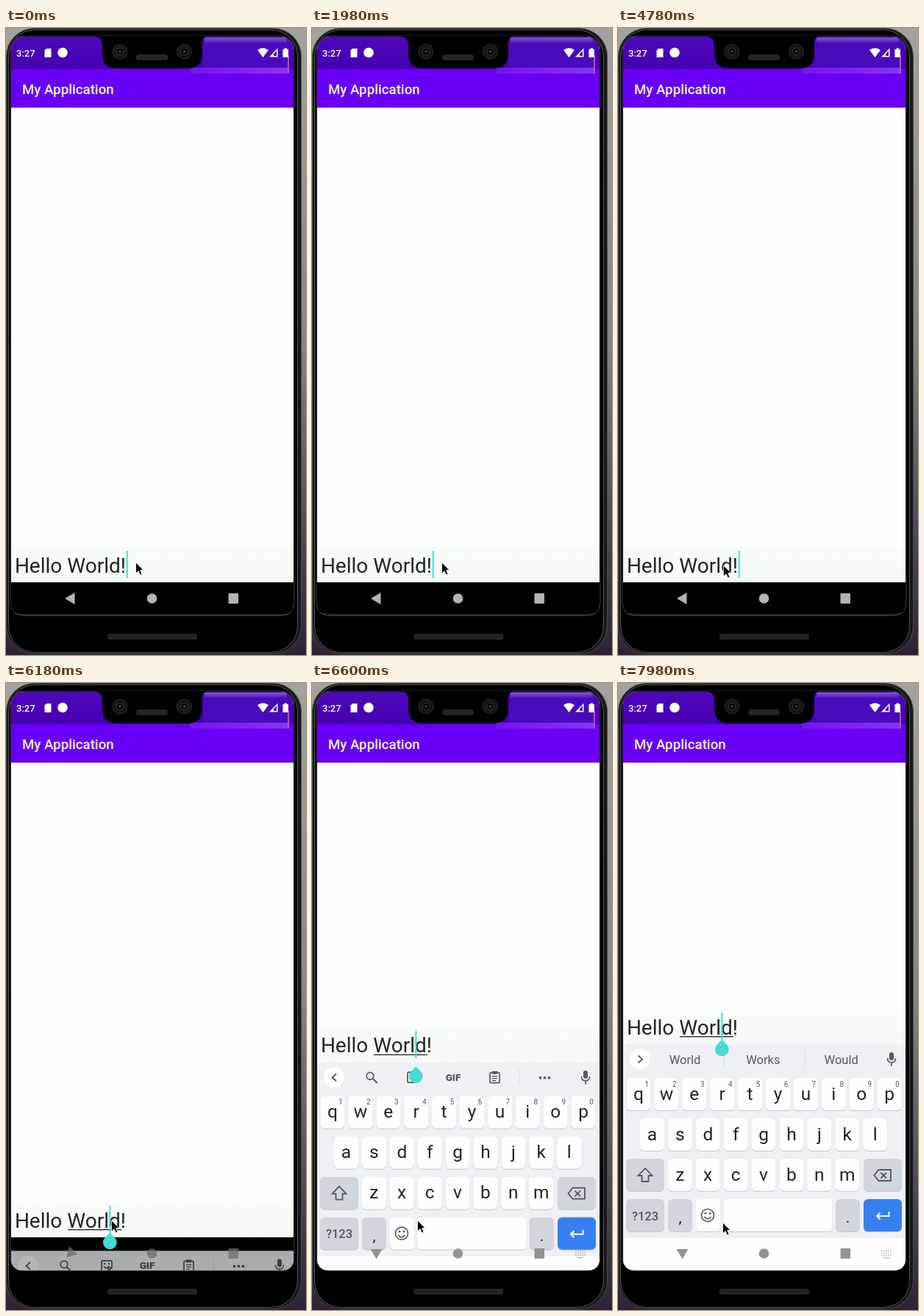
Animation of 408 by 854 pixels, one loop 8000 ms. Source, as an HTML page with a canvas:

```html
<!DOCTYPE html>
<html lang="en">
<head>
<meta charset="utf-8">
<title>Keyboard opening</title>
<style>
  html, body { margin: 0; width: 100%; height: 100%; overflow: hidden; background: #888; }
  canvas { display: block; }
</style>
</head>
<body>
<canvas id="stage" width="408" height="854"></canvas>
<script>
const ctx = document.getElementById('stage').getContext('2d');
const LOOP = 8000;
const CLICK = 5950;        // tap that moves the caret and opens the keyboard
const SUGGEST = 6900;      // toolbar gives way to suggestions
const INK = '#222325', GREY = '#55585c', TEAL = '#44ddd0';
const KEY = '#fefefe', DIM_KEY = '#d1d5dc', DIVIDER = '#d9dce1';

// Keyframe rows: [time, value, value...]
const POINTER = [[3340, 176, 728], [3560, 170, 736], [3900, 156, 741], [4260, 146, 737], [4560, 143, 732],
  [6800, 143, 732], [7800, 142, 735]];
const SLIDE = [[6060, 310], [6120, 301], [6180, 282], [6300, 207], [6420, 125], [6510, 70], [6600, 25], [6660, 8], [6740, 0]];
const HANDLE = [[6230, 263], [6420, 167], [6600, 37], [6660, 14], [6760, 0]];
const NAV_SHADE = [[6060, 1], [6180, 0.29], [6420, 0.12], [6600, 0]];
const BACK_TURN = [[6060, 0], [6300, -Math.PI / 2]];

function at(keys, t) {
  if (t <= keys[0][0]) return keys[0].slice(1);
  for (let i = 1; i < keys.length; i++) {
    const a = keys[i - 1], b = keys[i];
    if (t < b[0]) {
      const p = (t - a[0]) / (b[0] - a[0]);
      return a.slice(1).map((v, j) => v + (b[j + 1] - v) * p);
    }
  }
  return keys[keys.length - 1].slice(1);
}

function rect(x, y, w, h, color) {
  ctx.fillStyle = color;
  ctx.fillRect(x, y, w, h);
}
function box(x, y, w, h, r, fill, stroke, width = 1) {
  ctx.beginPath();
  ctx.roundRect(x, y, w, h, r);
  paint(fill, stroke, width);
}
function disc(x, y, r, fill, stroke, width = 1) {
  ctx.beginPath();
  ctx.arc(x, y, r, 0, 7);
  paint(fill, stroke, width);
}
function shape(d, fill, stroke, width = 1, x = 0, y = 0) {
  ctx.save();
  ctx.translate(x, y);
  const path = new Path2D(d);
  if (fill) { ctx.fillStyle = fill; ctx.fill(path); }
  if (stroke) { ctx.strokeStyle = stroke; ctx.lineWidth = width; ctx.stroke(path); }
  ctx.restore();
}
function paint(fill, stroke, width) {
  if (fill) { ctx.fillStyle = fill; ctx.fill(); }
  if (stroke) { ctx.strokeStyle = stroke; ctx.lineWidth = width; ctx.stroke(); }
}
function text(s, x, y, size, color, weight = 400, align = 'left') {
  ctx.font = `${weight} ${size}px Roboto, sans-serif`;
  ctx.textAlign = align;
  ctx.fillStyle = color;
  ctx.fillText(s, x, y);
}
function gradient(x0, y0, x1, y1, ...colors) {
  const g = ctx.createLinearGradient(x0, y0, x1, y1);
  colors.forEach((c, i) => g.addColorStop(i / (colors.length - 1), c));
  return g;
}

function drawBody() {
  rect(0, 0, 408, 854, gradient(0, 0, 0, 854, '#a3a29e', '#858585', '#2c2436'));
  box(0.5, 0.5, 401, 852, 38, '#18181a', '#48484a');
  box(3.5, 2.5, 393, 848, 36, '#000', '#555557');
  box(6, 11, 386, 789.5, 18, '#000', '#3c3c3e');
  box(138, 825, 122, 8, 3, '#242426');
}

function drawTopBars() {
  rect(7, 56, 384, 52.5, '#6800f6');
  rect(7, 12, 384, 44, gradient(0, 12, 0, 56, '#4c08ba', '#4600b2'));
  rect(268, 13, 116, 43, '#480cbc');
  rect(270, 13, 112, 7, gradient(0, 13, 0, 20, '#7c58d0', '#5519c4'));
  rect(250, 54, 135, 8, gradient(250, 0, 385, 0, '#7214f1', '#8a35ee'));
  rect(383, 38, 2, 24, '#b04fd2');
  text('My Application', 22, 90, 18.7, '#fff', 500);

  text('3:27', 14, 38.5, 13, '#fff', 500);
  shape('M55 28H61.5V40H52.5V30.5Z', '#fff');
  disc(77, 33.5, 6.8, '#fff');
  shape('M342 30Q349.500 24.500 357 30L349.500 40Z', '#fff');
  shape('M369.500 27.500V39.500H358Z', '#fff');
  shape('M364 35.500L368 31V38H364Z', '#480cbc');
  shape('M376.500 29H378.500V27.500H382V29H384V40H376.500Z', '#fff');
}

function drawNotch() {
  shape('M118 11Q131 12 131 23V35Q131 55 151 55H247Q267 55 267 35V20Q267 12 274 11Z', '#000');
  for (const x of [155, 242.5]) {
    disc(x, 32, 10, '#141416', '#2c2c2f');
    disc(x, 32, 5, '#08080a', '#39393c');
    disc(x, 32, 1.5, '#4b4b4e');
  }
  box(177, 36, 43, 8, 4, '#242427');
}

function drawField(top, t) {
  rect(7, top, 384, 50, gradient(0, top, 0, top + 50, '#f9fdf9', '#f4f9f5'));
  text('Hello World!', 11.9, top + 35.5, 28, INK);
  const tapped = t >= CLICK;
  if (tapped) rect(84, top + 38, 73, 1.3, INK);
  const lit = (t + 350) % 1000 < 500 || (tapped && t < 6650);
  if (lit) rect(tapped ? 140.4 : 163.7, top + 6, 2, 37, TEAL);
}

function key(x, y, w, color = KEY) {
  box(x, y + 1, w, 44, 6, '#c5c8ce');
  box(x, y, w, 44, 6, color);
}

function drawKeyRow(letters, x, y, digits) {
  [...letters].forEach((letter, i) => {
    const cx = x + i * 37.9;
    key(cx - 16.5, y, 33);
    text(letter, cx, y + 29.5, 24.5, INK, 400, 'center');
    if (digits) text((i + 1) % 10, cx + 11, y + 11.5, 10, GREY, 400, 'center');
  });
}

function drawToolbar() {
  shape('M33 507.500L27.500 512.500L33 517.500', null, GREY, 1.8);
  disc(79, 510.500, 4.800, null, GREY, 1.8);
  shape('M82.500 514L88.500 520', null, GREY, 2);
  shape('M131.500 505.500H142.500Q144 505.500 144 507V515L139 519.500H131.500Q130 519.500 130 518V507Q130 505.500 131.500 505.500ZM144 515H139V519.500M133 513Q136 518 140 513', null, GREY, 1.7);
  disc(134, 509.500, 1.2, GREY);
  disc(140, 509.500, 1.2, GREY);
  text('GIF', 192, 517, 13.5, GREY, 900, 'center');
  box(242, 506, 13, 14, 1.5, null, GREY, 1.7);
  rect(245, 504, 7, 4, GREY);
  shape('M245 511H252M245 514H252M245 517H250', null, GREY, 1.3);
  rect(281.5, 501, 1, 22, DIVIDER);
  for (const x of [310.5, 316.5, 322.5]) disc(x, 513, 1.9, GREY);
}

function drawSuggestions() {
  shape('M27.500 507.500L33 512.500L27.500 517.500', null, GREY, 1.8);
  ['World', 'Works', 'Would'].forEach((word, i) =>
    text(word, 91 + i * 106.3, 518.5, 16.5, GREY, 400, 'center'));
  for (const x of [144, 253.5]) rect(x, 501, 1, 22, DIVIDER);
}

// Laid out at its resting place, shifted down by `offset` while opening.
function drawKeyboard(offset, t) {
  ctx.save();
  ctx.translate(0, offset);
  rect(7, 492, 384, 264, '#eef0f4');
  disc(30, 512.5, 14, KEY);
  if (t < SUGGEST) drawToolbar(); else drawSuggestions();
  box(369, 503, 6, 11, 3, GREY);
  shape('M366.500 511Q366.500 517 372 517T377.500 511M372 517V522', null, GREY, 1.6);

  drawKeyRow('qwertyuiop', 28, 538, true);
  drawKeyRow('asdfghjkl', 46.500, 593);
  drawKeyRow('zxcvbnm', 84.300, 648);
  key(11, 648, 52, DIM_KEY);
  shape('M37 661L27.500 671H32.500V679H41.500V671H46.500Z', null, GREY, 1.8);
  key(334, 648, 52, DIM_KEY);
  shape('M354.500 663H371V678H354.500L348.500 670.500ZM357.500 667L365 674.500M365 667L357.500 674.500', null, GREY, 1.8);

  key(11, 703, 52, DIM_KEY);
  text('?123', 37, 731.500, 16.5, GREY, 500, 'center');
  key(68, 703, 33, DIM_KEY);
  text(',', 84.500, 735, 21, INK, 400, 'center');
  key(106, 703, 33);
  disc(122, 725, 8.500, null, GREY, 1.7);
  disc(119, 722.500, 1.4, GREY);
  disc(125, 722.500, 1.4, GREY);
  shape('M117.500 727Q122 733.500 126.500 727', null, GREY, 1.6);
  key(143.500, 703, 148);
  key(296, 703, 33, DIM_KEY);
  text('.', 312.500, 735, 21, INK, 400, 'center');
  key(334, 703, 52, '#3580f2');
  shape('M368.500 720V726H352M356.500 721.500L352 726L356.500 730.500', null, '#fff', 2);
  ctx.restore();
}

function drawNavIcons(t) {
  const color = t < 6060 ? '#b3b3b3' : t < 6500 ? '#6e6e70bb' : '#939395';
  ctx.save();
  ctx.translate(87.500, 777);
  ctx.rotate(at(BACK_TURN, t)[0]);
  shape('M-7.500 0L6 -8V8Z', color);
  ctx.restore();
  disc(198.5, 777, 6.800, color);
  box(302.500, 770, 13.5, 14, 1, color);
  if (t >= 6300) {
    const pale = '#bdbdbf';
    for (let row = 0; row < 3; row++)
      for (let i = 0; i < 5; i++) rect(358 + i * 3, 772.500 + row * 3, 1.8, 1.6, pale);
    rect(361, 782, 8, 1.5, pale);
  }
}

function drawHandle(y) {
  shape('M0 -13.2L6.600 -6.600A9.330 9.330 0 1 1 -6.600 -6.600Z', TEAL, null, 1, 141.3, y);
}

function drawPointer(x, y) {
  shape('M0.500 0V15L4 11.500L6.500 17L9 16L6.700 10.500H11Z', '#000', '#fff', 0.8, x, y);
}

function draw(t) {
  const slide = at(SLIDE, t)[0];
  const fieldTop = 443 + Math.min(slide, 263);
  const shade = at(NAV_SHADE, t)[0];

  drawBody();
  ctx.save();
  ctx.beginPath();
  ctx.roundRect(7, 12, 384, 788, [18, 18, 14, 14]);
  ctx.clip();
  rect(7, 12, 384, 788, '#fefefe');
  drawTopBars();
  drawField(fieldTop, t);
  if (t < 6300) rect(7, 755, 384, 45, '#000');
  if (slide < 310) {
    drawKeyboard(slide, t);
    rect(7, 755, 384, 45, `rgba(0,0,0,${shade})`);
  }
  drawNavIcons(t);
  if (t >= CLICK) drawHandle(499 + at(HANDLE, t)[0]);
  ctx.restore();
  if (t < 6100) shape('M12 796Q15 799 20 799H378Q383 799 386 796', null, '#4c4c4e');
  drawNotch();
  drawPointer(...at(POINTER, t));
}

function tick() {
  draw(performance.now() % LOOP);
  requestAnimationFrame(tick);
}
tick();
</script>
</body>
</html>
```
